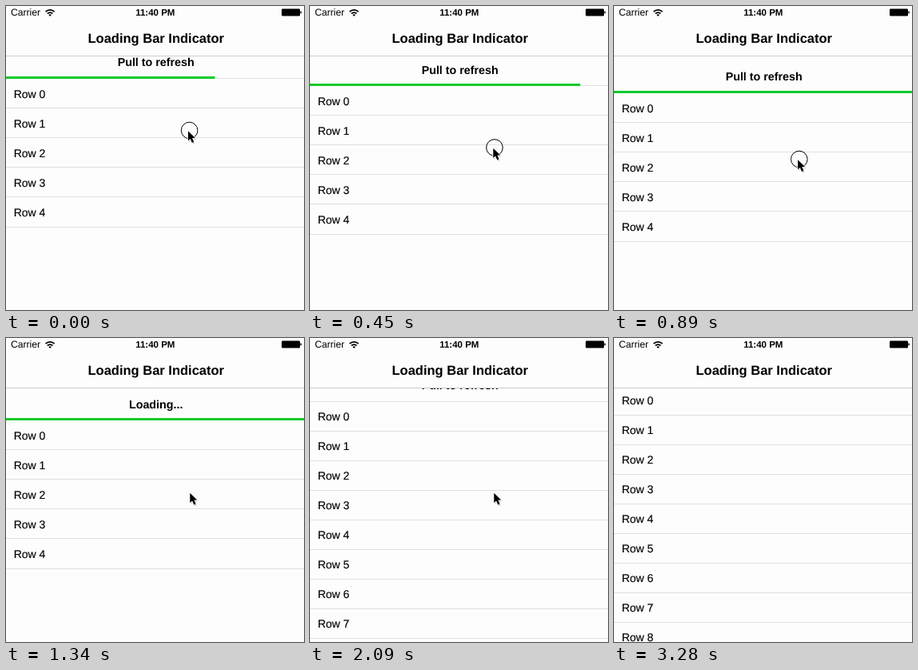
Write an HTML page that moves like this. It is 373 by 380 pixels and loops after 3.9 s.

```html
<!DOCTYPE html>
<html lang="en">
<head>
<meta charset="utf-8">
<title>Loading bar</title>
<style>
  html, body { margin: 0; width: 100%; height: 100%; overflow: hidden; background: #fdfdfd; }
  svg { display: block; font-family: "Liberation Sans", Arial, sans-serif; }
  text { fill: #000; text-rendering: geometricPrecision; }
  .strong { font-weight: bold; text-anchor: middle; }
  .row { font-size: 14px; stroke: #000; stroke-width: .15; }
  .line { fill: #e0e0e0; }
</style>
</head>
<body>
<svg width="373" height="380" viewBox="0 0 373 380">
  <rect width="373" height="380" fill="#fdfdfd"/>
  <g id="list"></g>
  <rect id="bar" height="3" fill="#0fc92c"/>
  <text id="label" class="strong" x="187.7" font-size="14.3"></text>

  <rect width="373" height="62" fill="#fdfdfd"/>
  <rect y="62" width="373" height="1" fill="#cbcbcb"/>
  <text x="5.9" y="12.3" font-size="12.2">Carrier</text>
  <g fill="none" stroke="#000" stroke-width="1.8">
    <path d="M49.6 7.2a7.8 7.8 0 0 1 11 0"/>
    <path d="M51.9 9.5a4.6 4.6 0 0 1 6.4 0"/>
  </g>
  <path d="M55.1 13l-1.8-1.9a2.6 2.6 0 0 1 3.6 0z"/>
  <text class="strong" x="186.8" y="12.3" font-size="11.5">11:40 PM</text>
  <rect x="345" y="3.5" width="23" height="9" rx="1.2"/>
  <path d="M368.5 6.3q1.6.3 1.6 1.7t-1.6 1.7z"/>
  <text class="strong" x="187.8" y="46" font-size="16.5">Loading Bar Indicator</text>

  <g id="pointer">
    <circle id="ring" cx="2" r="10.3" fill="none" stroke="#000"/>
    <g transform="translate(.3 .7)">
      <path d="M1 2v12l2.7-2.6 2.1 5 2.6-.9-2-4.8h3.8z" opacity=".22"/>
      <path d="M0 0v12.4l2.8-2.7 2.2 5 2.3-1-2.1-4.8h3.8z" stroke="#fff" stroke-width="1.6" paint-order="stroke"/>
    </g>
  </g>
</svg>
<script>
const LOOP = 3900, WIDTH = 373, ROW = 37;
const $ = id => document.getElementById(id);

// start time, top of the first row, pointer x, pointer y, state
const poses = [
  [0, 90, 227.6, 155.5, 'pull'],
  [150, 91.5, 228, 159.5, 'pull'],
  [300, 97, 228.6, 171.5, 'pull'],
  [450, 99.4, 229, 177, 'pull'],
  [600, 106, 229.8, 189.3, 'pull'],
  [750, 107, 229.8, 190.4, 'pull'],
  [890, 108, 229.8, 191.5, 'pull'],
  [1340, 102.4, 230, 193, 'load'],
  [1640, 101.5, 230, 193, 'load'],
  [2090, 78.7, 230, 193, 'done'],
  [2240, 58.7, 230, 193, 'done'],
  [2690, 58.7, 229.2, 193, 'done'],
  [2840, 58.7, 276.7, 270, 'done'],
  [2980, 58.7, 304.5, 324, 'done'],
  [3130, 58.7, 320.5, 364, 'done'],
  [3280, 58.7, 0, 0, 'done']
];

function add(tag, attrs) {
  const el = document.createElementNS('http://www.w3.org/2000/svg', tag);
  for (const key in attrs) el.setAttribute(key, attrs[key]);
  return $('list').appendChild(el);
}

const addLine = () => add('rect', { class: 'line', width: WIDTH, height: 1 });
const topLine = addLine();
const rows = Array.from({ length: 9 }, (_, i) => {
  const line = addLine();
  const text = add('text', { class: 'row', x: 9.7 });
  text.textContent = 'Row ' + i;
  return { line, text };
});

const show = (el, on) => el.setAttribute('visibility', on ? 'visible' : 'hidden');

function draw([, top, x, y, state]) {
  const done = state === 'done';
  const count = done ? 9 : 5;

  topLine.setAttribute('y', Math.round(top));
  rows.forEach(({ line, text }, i) => {
    const last = i === 4 && !done;
    line.setAttribute('y', Math.round(top + ROW * (i + 1) + (last ? 0.6 : 0)));
    text.setAttribute('y', Math.round(top + 24.7) + ROW * i);
    show(line, i < count);
    show(text, i < count);
  });

  const pulled = state === 'load' ? WIDTH : Math.min(WIDTH, 8.17 * (top - 58));
  $('bar').setAttribute('y', Math.round(top) - 2);
  $('bar').setAttribute('width', done ? 0 : pulled);

  $('label').textContent = state === 'load' ? 'Loading...' : 'Pull to refresh';
  $('label').setAttribute('y', Math.round(top - 14.6));

  $('pointer').setAttribute('transform', `translate(${x} ${y})`);
  $('pointer').setAttribute('display', x ? 'inline' : 'none');
  show($('ring'), state === 'pull');
}

let current;
const start = performance.now();
function tick() {
  const t = (performance.now() - start) % LOOP;
  const pose = poses.findLast(p => p[0] <= t);
  if (pose !== current) draw(current = pose);
  requestAnimationFrame(tick);
}
tick();
</script>
</body>
</html>
```
